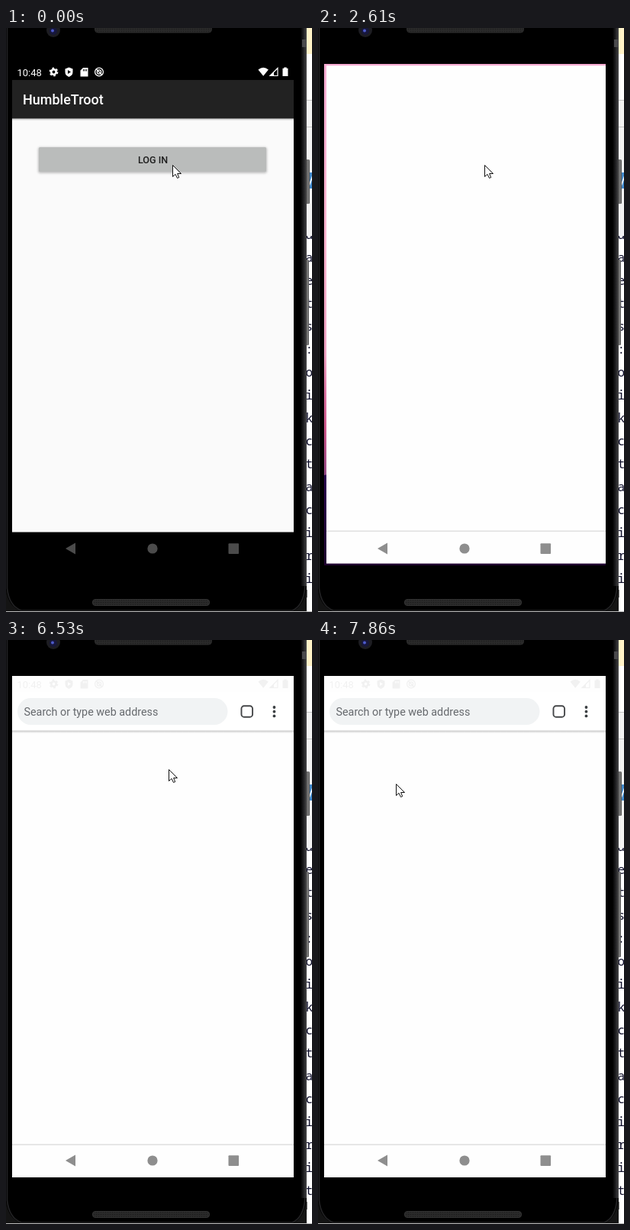
Animation, 401 px wide and 764 px high, one loop 8000 ms. Source, as an HTML page:

```html
<!DOCTYPE html>
<html lang="en">
<head>
<meta charset="utf-8">
<title>Log in flow</title>
<style>
html, body { margin: 0; width: 100%; height: 100%; overflow: hidden; background: #fff; }
svg { display: block; width: 100vw; height: 100vh; }
text { font-family: Roboto, sans-serif; }
.code text { font: 16px "Noto Sans Mono", monospace; text-anchor: middle; fill: #10102c; }
</style>
</head>
<body>
<svg viewBox="0 0 401 764" xmlns="http://www.w3.org/2000/svg">
  <defs>
    <linearGradient id="sky" x1="0" y1="47" x2="0" y2="703" gradientUnits="userSpaceOnUse">
      <stop offset="0" stop-color="#f6abd2"/>
      <stop offset=".35" stop-color="#f9b3cd"/>
      <stop offset=".58" stop-color="#eda0c0"/>
      <stop offset=".66" stop-color="#d9709f"/>
      <stop offset=".73" stop-color="#cb5488"/>
      <stop offset=".82" stop-color="#944a86"/>
    </linearGradient>
    <linearGradient id="hill" x1="0" y1="0" x2="0" y2="1">
      <stop offset="0" stop-color="#2c0052"/>
      <stop offset="1" stop-color="#200030"/>
    </linearGradient>
    <linearGradient id="edge">
      <stop offset="0" stop-color="#000"/>
      <stop offset=".45" stop-color="#1c1c1e"/>
      <stop offset=".8" stop-color="#363638"/>
      <stop offset="1" stop-color="#4a4a4c"/>
    </linearGradient>
    <linearGradient id="key">
      <stop offset="0" stop-color="#3c3c3c"/>
      <stop offset=".6" stop-color="#858585"/>
      <stop offset="1" stop-color="#4a4a4a"/>
    </linearGradient>
    <linearGradient id="shade" x1="0" y1="0" x2="0" y2="1">
      <stop offset="0" stop-color="#000" stop-opacity=".22"/>
      <stop offset="1" stop-color="#000" stop-opacity="0"/>
    </linearGradient>
    <pattern id="mesh" width="3" height="3" patternUnits="userSpaceOnUse">
      <rect width="3" height="3" fill="#2a2a2a"/>
      <circle cx="1.5" cy="1.5" r=".8" fill="#1c1c1c"/>
    </pattern>
    <filter id="soft" x="-10%" y="-30%" width="120%" height="160%"><feGaussianBlur stdDeviation="1.6"/></filter>
    <clipPath id="screen"><rect x="8" y="47" width="369" height="656"/></clipPath>
    <clipPath id="pane"><rect x="390" y="272" width="11" height="454"/></clipPath>
    <clipPath id="barClip"><rect id="barBox" x="8" y="47" width="369" height="21"/></clipPath>
  </defs>

  <!-- window behind the phone -->
  <rect width="401" height="764" fill="#fff"/>
  <rect x="392" width="9" height="34" fill="#fff3c8"/>
  <rect x="392" y="94" width="9" height="178" fill="#f2f2f2"/>
  <path d="M392 94.5h9M392 129.5h9" stroke="#c4c4c4"/>
  <rect x="392" y="189" width="9" height="21" fill="#4289cb"/>
  <path d="M397 207l5-14" stroke="#fff" stroke-width="1.6"/>
  <g class="code" clip-path="url(#pane)"><g id="code"></g></g>
  <path d="M394.5 735v10" stroke="#777"/>

  <!-- phone body -->
  <rect width="394" height="764" fill="#141414"/>
  <path d="M0 0H394V728Q392 757 375 763H20Q3 757 0 735Z" fill="#000"/>
  <rect x="386" width="8" height="730" fill="url(#edge)"/>
  <path d="M1.5 0V733Q4 756 20 762H375Q390 756 392 730" fill="none" stroke="#242426" stroke-width="1.6"/>
  <path d="M0 763.5H401" stroke="#b8b8b8"/>
  <rect x="388" y="15" width="6" height="10" fill="#4a4a4c"/>
  <rect x="393" y="172" width="5" height="58" rx="1.5" fill="url(#key)"/>
  <rect x="393" y="303" width="4" height="112" rx="1.5" fill="url(#key)"/>
  <rect x="116.5" y="-6" width="153" height="12" rx="4" fill="url(#mesh)" stroke="#2c2c2c"/>
  <rect x="113.5" y="747.5" width="153" height="8" rx="3.5" fill="url(#mesh)" stroke="#343434"/>
  <circle cx="62" cy="3" r="9" fill="#1d1d22"/>
  <circle cx="62" cy="4" r="5" fill="#17173c"/>
  <circle cx="61" cy="3.5" r="2" fill="#4c5ac8"/>

  <g clip-path="url(#screen)">
    <g id="login">
      <rect x="8" y="47" width="369" height="656" fill="#000"/>
      <rect x="8" y="118" width="369" height="541.5" fill="#fafafa"/>
      <rect x="8" y="118.5" width="369" height="3" fill="url(#shade)"/>
      <rect x="8" y="68" width="369" height="50.5" fill="#222"/>
      <text x="22" y="100" font-size="18" font-weight="500" fill="#fff">HumbleTroot</text>
      <rect id="glow" x="43" y="157" width="298" height="32" rx="2" filter="url(#soft)"/>
      <rect id="button" x="43" y="156" width="298" height="32" rx="1.5"/>
      <text x="192.5" y="177.3" font-size="12.56" font-weight="500" text-anchor="middle" fill="#1d1d1d">LOG IN</text>
    </g>

    <g id="home">
      <rect x="8" y="47" width="369" height="656" fill="url(#sky)"/>
      <path d="M8 585L28 581H377V703H8Z" fill="url(#hill)"/>
      <g id="oldCard">
        <rect x="8" y="64" width="3" height="624" fill="#000"/>
        <rect x="8" y="83" width="3" height="48" fill="#222"/>
        <rect x="8" y="131" width="3" height="514" fill="#fafafa"/>
      </g>
    </g>

    <g id="page">
      <rect id="card" fill="#fefefe"/>
      <rect id="rule" height="1.4" fill="#dedede"/>
    </g>

    <g id="tools">
      <rect x="8" y="68" width="369" height="50.5" fill="#fff"/>
      <rect x="8" y="118.5" width="369" height="3.5" fill="url(#shade)"/>
      <rect x="15" y="76" width="275.5" height="35" rx="17.5" fill="#f1f3f4"/>
      <text x="23.5" y="99" font-size="14.33" fill="#66696d">Search or type web address</text>
      <rect x="308.5" y="86.3" width="14.6" height="14.4" rx="3.5" fill="none" stroke="#454749" stroke-width="1.9"/>
      <g fill="#3c4043"><circle cx="351.5" cy="88" r="1.9"/><circle cx="351.5" cy="93.7" r="1.9"/><circle cx="351.5" cy="99.4" r="1.9"/></g>
    </g>

    <g clip-path="url(#barClip)">
      <g id="bar">
        <text x="14.5" y="62.5" font-size="13">10:48</text>
        <circle cx="62.5" cy="57.5" r="3.2" fill="none" stroke="currentColor" stroke-width="2.6"/>
        <circle cx="62.5" cy="57.5" r="5" fill="none" stroke="currentColor" stroke-width="1.8" stroke-dasharray="2.6 2.636"/>
        <path fill-rule="evenodd" d="M82.5 51.5l5 2v4q0 4.5-5 6.5q-5-2-5-6.5v-4zM81 55v5l4-2.5z"/>
        <path fill-rule="evenodd" d="M101 52h6.5v11.5h-10v-8zM101 54v2.5h1v-2.5zM103 54v2.5h1v-2.5zM105 54v2.5h1v-2.5z"/>
        <g fill="none" stroke="currentColor" stroke-width="1.3">
          <circle cx="122" cy="57.5" r="5.4"/><circle cx="122" cy="57.5" r="2.6"/><path d="M118.5 54l7 7"/>
        </g>
        <path d="M330.5 54.5q6.7-5.5 13.4 0l-6.7 8.3z"/>
        <path d="M356 52.5v10h-10z" fill="none" stroke="currentColor" stroke-width="1.2"/>
        <path d="M351 57.5v5.5h-5.5z"/>
        <path d="M364.3 51.5h3.4v1.3h1.8v10.2h-7v-10.2h1.8z"/>
      </g>
    </g>
    <g id="nav">
      <path d="M78 681l13-7.5v15z"/>
      <circle cx="192" cy="681" r="6.6"/>
      <rect x="291.5" y="674.3" width="13.6" height="13.6" rx="1"/>
    </g>
  </g>

  <path id="mouse" d="M.5.5V15.5L4 12.3L6.5 17.4L8.7 16.5L6.6 11.5H11.5Z" fill="#fff" stroke="#111"/>
</svg>
<script>
const LOOP = 8000;
const $ = id => document.getElementById(id);
const set = (id, attrs) => { for (const k in attrs) $(id).setAttribute(k, attrs[k]); };
const show = (id, on) => set(id, { display: on ? 'inline' : 'none' });

// pointer stops: time, x, y
const stops = [
  [0, 218, 179], [6530, 213, 169], [6650, 203, 150], [6770, 192, 131], [6920, 177, 110],
  [7070, 177, 108], [7190, 176, 107], [7340, 170, 107], [7470, 164, 108],
  [7620, 149, 122], [7740, 125, 157], [7860, 102, 188]
];

$('code').innerHTML = [...'uaets:oikctacirit']
  .map((c, i) => `<text x="397.3" y="${275.5 + 30 * i}">${c}</text>`).join('');

function placeCard(open) {
  const mix = (a, b) => a + (b - a) * open;
  const x = mix(28, 8), top = mix(62, 47), bottom = mix(687, 703);
  set('card', { x, y: top, width: 377 - x, height: bottom - top });
  set('rule', { x, y: mix(646, 659.5), width: 377 - x });
  return top;
}

function draw(t) {
  const login = t < 2460, web = t >= 2730, pressed = t < 290;
  show('login', login);
  show('home', !login && !web);
  show('oldCard', t < 2610);
  show('page', !login);
  show('tools', t >= 5720);

  set('button', { fill: pressed ? '#babcbb' : '#d1d3d2' });
  set('glow', pressed
    ? { fill: '#999', stroke: '#999', 'stroke-width': 2, opacity: .6 }
    : { fill: '#aaa', stroke: 'none', opacity: .6 });

  const top = placeCard(web ? 1 : t < 2610 ? 0 : .85);
  set('barBox', { height: login || web ? 21 : top - 47 });
  const ink = login ? '#fff' : web ? '#f1f1f1' : '#fce6f1';
  set('bar', { fill: ink, color: ink });
  set('nav', { fill: login ? '#4b4b4b' : '#8e8e8e' });

  set('code', { transform: `translate(0 ${t < 3020 ? 0 : -30})` });
  const [, x, y] = stops.filter(s => s[0] <= t).pop();
  set('mouse', { transform: `translate(${x} ${y})` });
}

const start = performance.now();
function tick() {
  draw((performance.now() - start) % LOOP);
  requestAnimationFrame(tick);
}
tick();
</script>
</body>
</html>
```
